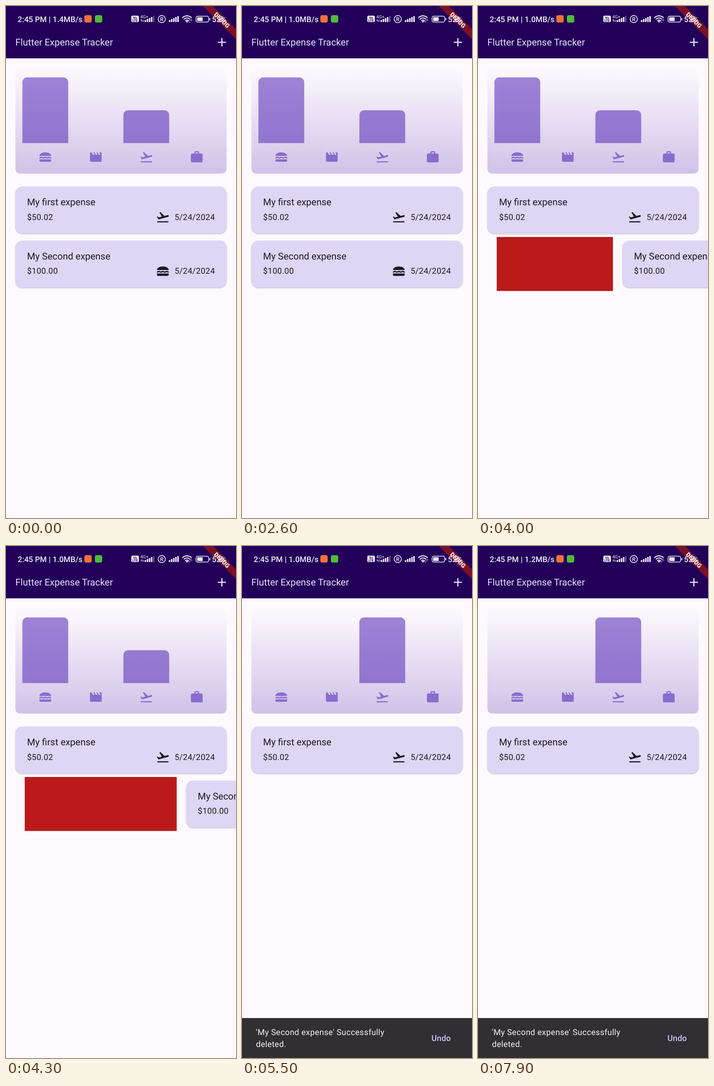
An HTML page for the animation above (8 s loop, 502 by 1115 pixels).

```html
<!DOCTYPE html>
<html lang="en">
<head>
<meta charset="utf-8">
<title>Expense tracker</title>
<style>
  html, body { margin: 0; width: 100%; height: 100%; overflow: hidden; background: #fef9fe; }
  svg { display: block; width: 100%; height: 100%; font-family: Roboto, sans-serif; text-rendering: geometricPrecision; }
  .title { font-size: 20.45px; }
  .body { font-size: 17.9px; letter-spacing: .32px; }
  .status { font-size: 17px; font-weight: 500; }
  .card { fill: #dfd5f4; filter: drop-shadow(0 1.3px 1px rgba(0, 0, 0, .27)); }
  .card-text { fill: #1d1a22; }
</style>
</head>
<body>
<svg viewBox="0 0 502 1115">
  <defs>
    <linearGradient id="panelFill" x1="0" y1="0" x2="0" y2="1">
      <stop offset="0" stop-color="#fef9fe"/><stop offset="1" stop-color="#cfc2e8"/>
    </linearGradient>
    <linearGradient id="barFill" gradientUnits="userSpaceOnUse" x1="0" y1="155" x2="0" y2="299">
      <stop offset="0" stop-color="#9d82d5"/><stop offset="1" stop-color="#9174cf"/>
    </linearGradient>
    <symbol id="burger" viewBox="0 0 24 24"><path d="M18.66 11.5c-1.95 0-2.09 1-3.33 1-1.19 0-1.42-1-3.33-1-1.95 0-2.09 1-3.33 1-1.19 0-1.42-1-3.33-1-1.95 0-2.09 1-3.33 1v2c1.9 0 2.17-1 3.35-1 1.19 0 1.42 1 3.33 1 1.95 0 2.09-1 3.33-1 1.19 0 1.42 1 3.33 1 1.95 0 2.09-1 3.33-1 1.19 0 1.4.98 3.32 1v-2c-1.18 0-1.41-1-3.34-1zM22 10c.32-3.28-4.28-6-9.99-6C6.3 4 1.7 6.72 2.02 10zM2 16h20v2c0 1.1-.9 2-2 2H4c-1.1 0-2-.9-2-2z"/></symbol>
    <symbol id="movie" viewBox="0 0 24 24"><path d="M18 4l2 4h-3l-2-4h-2l2 4h-3l-2-4H8l2 4H7L5 4H4c-1.1 0-2 .9-2 2v12c0 1.1.9 2 2 2h16c1.1 0 2-.9 2-2V4z"/></symbol>
    <symbol id="plane" viewBox="0 0 24 24"><path d="M2.5 19h19v2h-19zm19.57-9.36c-.21-.8-1.04-1.28-1.84-1.06L14.92 10l-6.9-6.43-1.93.51 4.14 7.17-4.97 1.33-1.97-1.54-1.45.39 1.82 3.16.77 1.33 1.6-.43 5.31-1.42 4.35-1.16L21 11.49c.81-.23 1.28-1.05 1.07-1.85z"/></symbol>
    <symbol id="work" viewBox="0 0 24 24"><path fill-rule="evenodd" d="M20 6h-4V4c0-1.11-.89-2-2-2h-4c-1.11 0-2 .89-2 2v2H4c-1.11 0-2 .89-2 2v11c0 1.11.89 2 2 2h16c1.11 0 2-.89 2-2V8c0-1.11-.89-2-2-2zm-6 0h-4V4h4z"/></symbol>
  </defs>

  <rect width="502" height="1115" fill="#fef9fe"/>
  <rect width="502" height="114" fill="#220059"/>
  <text class="title" x="20.5" y="86" fill="#e9ddff">Flutter Expense Tracker</text>
  <path d="M462.3 79H480.2M471.2 70V88" stroke="#e9ddff" stroke-width="2.6"/>

  <rect x="20.5" y="135" width="461" height="230" rx="10.2" fill="url(#panelFill)"/>
  <g id="bars" fill="url(#barFill)"></g>
  <g id="chartIcons" fill="#8a6bce"></g>

  <g id="cards"></g>
  <rect id="dismissBack" x="40.9" y="503" fill="#ba1a1a"/>

  <g id="snackbar">
    <rect y="1028" width="502" height="88" fill="#322f33"/>
    <g id="snackText" class="body" fill="#f4eff4">
      <text x="30.5" y="1065">'My Second expense' Successfully</text>
      <text x="30.5" y="1090.7">deleted.</text>
      <text x="413.5" y="1077.7" fill="#cfbcff" font-weight="500" style="letter-spacing:.13px">Undo</text>
    </g>
  </g>

  <g transform="translate(471.3 30.7) rotate(45)">
    <rect x="-70" y="-7.7" width="140" height="15.4" fill="#7c1026"/>
    <text y="4.7" font-size="13" font-weight="900" text-anchor="middle" fill="#fff">DEBUG</text>
  </g>

  <g fill="#f0eaf6">
    <text id="speed" class="status" x="25.5" y="35"></text>
    <rect x="171" y="20" width="16" height="16" rx="4" fill="#f3703a"/>
    <rect x="194" y="20" width="16" height="16" rx="4" fill="#4fbd37"/>
    <rect x="273.5" y="21" width="16.5" height="14" rx="2.5"/>
    <g fill="#220059" font-size="7" font-weight="700" text-anchor="middle">
      <text x="281.7" y="27.6">Vo</text><text x="281.7" y="33.7">LTE</text>
    </g>
    <text x="293" y="26.5" font-size="9.8">4G+</text>
    <path d="M295.5 34v-4M294 31.3l1.5-1.8 1.5 1.8M299 29.5v4M297.5 32.2l1.5 1.8 1.5-1.8" fill="none" stroke="#f0eaf6"/>
    <g id="signals"></g>
    <circle cx="340" cy="28.5" r="7.8" fill="none" stroke="#f0eaf6" stroke-width="1.7"/>
    <text x="340" y="33" font-size="12" font-weight="500" text-anchor="middle">R</text>
    <g fill="none" stroke="#f0eaf6" stroke-width="2.1">
      <path d="M384.8 25.6Q395 17 405.2 25.6M388 29Q395 23 402 29M391.2 32Q395 29 398.5 32"/>
      <path d="M400.5 33.5l3-3M400 31.5a2 2 0 1 0 2 3M402 29.5a2 2 0 1 1 2 3" stroke-width="1"/>
    </g>
    <path d="M392 33.2Q395 31.3 398 33.2L395 36.2z"/>
    <rect x="414.8" y="22.3" width="27.6" height="12.6" rx="3.6" fill="none" stroke="#f0eaf6" stroke-width="1.5"/>
    <rect x="417.2" y="24.5" width="12" height="8.2" rx="1.3"/>
    <rect x="443.8" y="26.3" width="2" height="4.6" rx="1"/>
    <text class="status" x="449.5" y="35">52%</text>
  </g>
</svg>
<script>
  const LOOP = 8000, STEP = 100;
  const $ = id => document.getElementById(id);

  const icon = (name, cx, cy) =>
    `<use href="#${name}" x="${cx - 15.35}" y="${cy - 15.35}" width="30.7" height="30.7"/>`;

  const card = (id, y, title, amount, iconName) => `
    <g id="${id}">
      <rect class="card" x="20.5" y="${y}" width="461" height="102.3" rx="15.3"/>
      <g class="card-text">
        <text class="title" x="46" y="${y + 41}">${title}</text>
        <text class="body" x="46" y="${y + 72.4}">${amount}</text>
        ${icon(iconName, 342.3, y + 66.5)}
        <text class="body" x="368" y="${y + 72.4}">5/24/2024</text>
      </g>
    </g>`;

  const signal = (x, lit) => [0, 1, 2, 3, 4].map(i => {
    const h = 4.6 + i * 2.1;
    return `<rect x="${x + i * 4.6}" y="${35 - h}" width="3.2" height="${h}" rx="1" opacity="${i < lit ? 1 : .35}"/>`;
  }).join('');

  const bar = (slot, share) => {
    const x = 35.8 + slot * 110.2, top = 298.6 - share * 143.1, r = 10.2;
    return `<path d="M${x} 298.6V${top + r}a${r} ${r} 0 0 1 ${r} ${-r}h${100 - 2 * r}a${r} ${r} 0 0 1 ${r} ${r}V298.6z"/>`;
  };

  $('chartIcons').innerHTML = ['burger', 'movie', 'plane', 'work']
    .map((name, i) => icon(name, 85.8 + i * 110.2, 329)).join('');
  $('cards').innerHTML = card('first', 393.3, 'My first expense', '$50.02', 'plane')
    + card('second', 511, 'My Second expense', '$100.00', 'burger');
  $('signals').innerHTML = signal(302.5, 4) + signal(355.5, 5);

  // [time, horizontal offset of the swiped card]
  const SWIPE = [[2900, 0], [3100, 30], [3300, 88], [3700, 212], [4100, 322], [4300, 372.6], [4500, 462], [4600, 502]];
  const SPEEDS = [[0, '1.4'], [2300, '1.0'], [6300, '1.2']];
  const RESIZE = 4600, DISMISSED = 4950;

  const clamp = v => Math.min(1, Math.max(0, v));
  const easeOut = v => 1 - (1 - v) ** 2.4;

  function track(points, t) {
    const next = points.findIndex(p => p[0] > t);
    if (next === 0) return points[0][1];
    if (next < 0) return points[points.length - 1][1];
    const [t0, a] = points[next - 1], [t1, b] = points[next];
    return a + (b - a) * (t - t0) / (t1 - t0);
  }

  function render(t) {
    const offset = track(SWIPE, t);
    $('second').setAttribute('transform', `translate(${offset})`);
    $('second').style.display = offset < 502 ? '' : 'none';

    const shrink = easeOut(clamp((t - RESIZE - 120) / 180));
    $('dismissBack').setAttribute('width', Math.max(0, Math.min(offset, 461) - 40.9));
    $('dismissBack').setAttribute('height', 117.6 * (1 - shrink));

    const dismissed = t >= DISMISSED;
    $('bars').innerHTML = dismissed ? bar(2, 1) : bar(0, 1) + bar(2, .5002);

    const reveal = clamp((t - DISMISSED) / 250);
    $('snackbar').style.display = dismissed ? '' : 'none';
    $('snackbar').setAttribute('transform', `translate(0 ${87 * (1 - easeOut(reveal))})`);
    $('snackText').setAttribute('opacity', clamp((reveal - .4) / .6));

    const rate = SPEEDS.filter(s => s[0] <= t).pop()[1];
    $('speed').textContent = `2:45 PM | ${rate}MB/s`;
  }

  let shown = -1;
  function tick() {
    const t = Math.floor(performance.now() % LOOP / STEP) * STEP;
    if (t !== shown) render(shown = t);
    requestAnimationFrame(tick);
  }
  tick();
</script>
</body>
</html>
```
